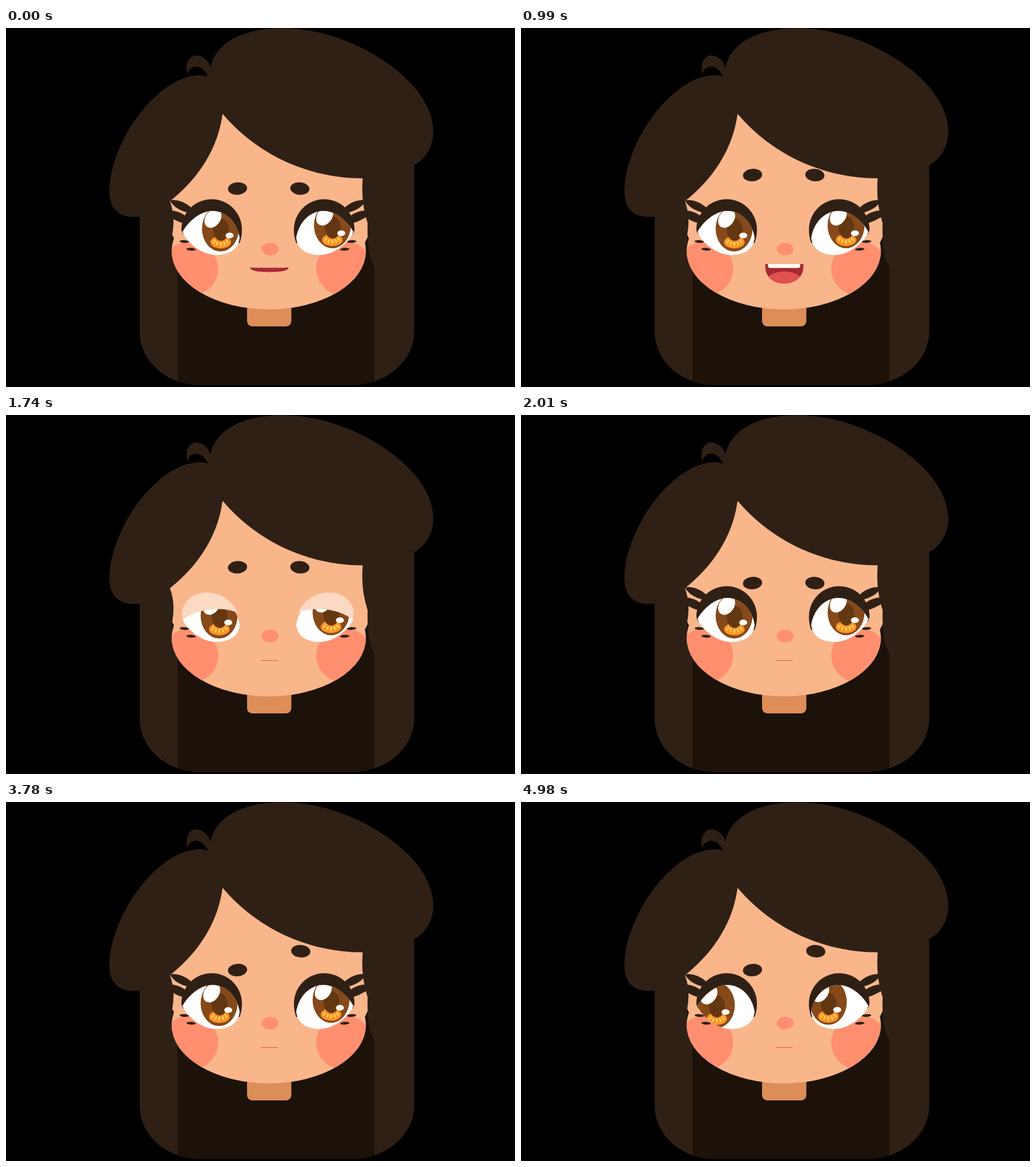
Write an HTML page that moves like this. It is 891x628 px and loops after 5100 ms.

```html
<!DOCTYPE html>
<html lang="en">
<head>
<meta charset="utf-8">
<title>Girl portrait</title>
<style>
  html, body { margin: 0; width: 100%; height: 100%; overflow: hidden; background: #000; }
  svg { display: block; width: 100vw; height: 100vh; }
  .hair { fill: #2f2015; }
  .skin { fill: #f9b68b; }
  .blush { fill: #ff8f6e; }
</style>
</head>
<body>
<svg viewBox="0 0 891 628" xmlns="http://www.w3.org/2000/svg">
  <defs>
    <path id="body" d="M234 200H714.5V531C714.5 583 665 624.500 605 624.500H340C281 624.500 234 583 234 531Z"/>
    <ellipse id="cheeks" cx="460" cy="390" rx="170" ry="102.300"/>
    <path id="white" d="M309 357C316 342 338 320 361 320C386 320 405 341 409 367C407 386 392 397 368 397C341 397 316 374 309 357Z"/>
    <path id="socket" d="M308 347C309 325 330 310.500 350 310.500C383 310 409 335 410 366C407 386 392 397.500 368 397.500C342 397 311 374 308 347Z"/>
    <path id="mouthShape" d="M427.500 413H494.500V417C494 437 478 447 461 447C443 447 428 437 427.500 417Z"/>
    <clipPath id="bodyClip"><use href="#body"/></clipPath>
    <clipPath id="faceClip"><use href="#cheeks"/></clipPath>
    <clipPath id="whiteL"><use href="#white"/></clipPath>
    <clipPath id="whiteR"><use href="#white" transform="matrix(-1 0 0 1 917 0)"/></clipPath>
    <clipPath id="socketClip"><use href="#socket"/></clipPath>
    <clipPath id="mouthClip"><use class="mouth" href="#mouthShape"/></clipPath>

    <g id="lashes" class="hair">
      <path d="M310 361C308 357 307 355 307 352A53 53 0 0 1 413 353C413 363 411 370 409 376Z"/>
      <path d="M287.500 302C295 299 312 303 324 314L318 323C303 319 293 312 287.500 303Z"/>
      <path d="M285 319C297 319 308 323 315 330L309 341C302 339 294 335 285 330Z"/>
    </g>
    <g id="lowLashes" class="hair">
      <ellipse cx="312" cy="373.500" rx="8.200" ry="2.400" transform="rotate(4 312 373.500)"/>
      <ellipse cx="324" cy="387" rx="8.200" ry="2.400" transform="rotate(4 324 387)"/>
    </g>
    <g id="lid" clip-path="url(#socketClip)">
      <path class="lidEdge" fill="#fbd9c3" d="M300 200V388C335 353 395 355 420 376V200Z"/>
    </g>
    <g id="irisInner">
      <ellipse cx="373.500" cy="374.700" rx="18" ry="10.800" fill="#ff9426"/>
      <ellipse cx="374" cy="353" rx="13.700" ry="19.500" fill="#633711"/>
      <g id="sparks" fill="#ffdc6c"></g>
      <ellipse cx="360" cy="333" rx="13" ry="18" fill="#fff" transform="rotate(35 360 333)"/>
      <ellipse cx="389" cy="363" rx="7" ry="5" fill="#fff"/>
    </g>
  </defs>

  <rect width="891" height="628"/>
  <use href="#body" class="hair"/>
  <rect x="300" y="340" width="345" height="290" fill="#1c120a" clip-path="url(#bodyClip)"/>
  <path d="M290.500 361L296 368L291 376Z" fill="#1c120a"/>
  <rect x="422" y="470" width="77.500" height="52" rx="9" fill="#dd8d58"/>
  <path class="skin" d="M379 150L280 290L287 303Q297 330 291 362L294 368V376H628L633 366V341Q622 305 625 255Z"/>
  <use href="#cheeks" class="skin"/>
  <g class="blush">
    <g clip-path="url(#faceClip)">
      <ellipse cx="322" cy="421" rx="49.500" ry="47.500"/>
      <ellipse cx="592.500" cy="421" rx="49.500" ry="47.500"/>
    </g>
    <ellipse cx="462.300" cy="386.800" rx="14.800" ry="11"/>
  </g>
  <path class="hair" d="M625 258Q620 302 633 341C632 375 635 402 645 417H665V240Z"/>

  <path class="hair" d="M379 150L358 69L354 85C345 82 337 82 332 83C283 88 236 140 212 183C192 219 181 255 181 285C181 316 197 334 234 330L250 328L287 303C336 264 371 212 379 150Z"/>
  <path class="hair" d="M379 150L350 110L354 85L358 69C367 26 415 0 484 .5C580 0 675 55 716 105C738 132 748 158 748 183C747 208 735 229 714 240L625 263C532 263 442 224 379 150Z"/>
  <path class="hair" d="M317.500 82C313 60 321 48 334 48C346 49 354 57 358 69L354 86C348 73 341 67.500 332 67.500C324 68 319 73 317.500 82Z"/>

  <g id="upper">
    <use href="#lashes"/>
    <use href="#lashes" transform="matrix(-1 0 0 1 917 0)"/>
  </g>
  <use href="#white" fill="#fff"/>
  <use href="#white" fill="#fff" transform="matrix(-1 0 0 1 917 0)"/>
  <g clip-path="url(#whiteL)">
    <g class="iris">
      <ellipse cx="373" cy="351" rx="32.300" ry="40" fill="#85491a"/>
      <use href="#irisInner"/>
    </g>
  </g>
  <g clip-path="url(#whiteR)">
    <g class="iris">
      <ellipse cx="569" cy="345.300" rx="32.300" ry="40" fill="#85491a"/>
      <use href="#irisInner" x="195.500" y="-4"/>
    </g>
  </g>
  <g id="lids">
    <use href="#lid"/>
    <use href="#lid" transform="matrix(-1 0 0 1 917 0)"/>
  </g>
  <use href="#lowLashes"/>
  <use href="#lowLashes" transform="matrix(-1 0 0 1 917 0)"/>

  <ellipse id="browL" class="hair" rx="16.800" ry="10.900"/>
  <ellipse id="browR" class="hair" rx="16.800" ry="10.900"/>

  <use class="mouth" href="#mouthShape" fill="#a52a32"/>
  <g clip-path="url(#mouthClip)">
    <ellipse cx="461" cy="442" rx="31" ry="16" fill="#e24f4f"/>
    <g class="mouth">
      <path id="teeth" d="M432.500 0H488.500V3.500Q488.500 6.800 485 6.800H436Q432.500 6.800 432.500 3.500Z" fill="#fff"/>
    </g>
  </g>
</svg>
<script>
const LOOP = 5100;
const $ = s => document.querySelector(s);
const place = (el, value) => el.setAttribute('transform', value);

const out = p => 1 - (1 - p) ** 2;
const backHalf = p => p * p * (3.59 * p - 2.59) / 2;
const backInOut = p => p < .5 ? backHalf(2 * p) : 1 - backHalf(2 - 2 * p);

// Each move is [begin, end, target value, easing].
function track(first, ...moves) {
  return t => {
    let v = first;
    for (const [a, b, to, ease = out] of moves) {
      if (t <= a) break;
      v += (to - v) * ease(Math.min(1, (t - a) / (b - a)));
    }
    return v;
  };
}

const lookX = track(2.5, [0, 420, -26], [790, 990, 0], [4185, 4650, -31, backInOut]);
const lookY = track(0, [2900, 3210, 18], [3380, 3780, 1], [4790, 4980, 4.5]);
const browLeft = track(281, [0, 420, 257.3], [1700, 2010, 294]);
const browRight = track(281, [0, 420, 257.3], [1700, 2010, 294], [2900, 3210, 261]);
const browShift = track(0, [2900, 3210, 1.6]);
const mouthY = track(423, [0, 420, 430], [1130, 1330, 428.5], [1330, 1530, 429.6]);
const mouthW = track(1, [1320, 1530, .45]);
const mouthH = track(.24, [0, 420, 1], [1130, 1330, .03]);

// Lid closure from 0 (open) to 1 (shut).
const blinks = [1130, 1700];
const closure = t => Math.max(0, ...blinks.map(b => 1 - Math.abs(t - b - 150) / 150));

for (let i = -2; i <= 2; i++) {
  const a = i * 25, r = a * Math.PI / 180;
  const spark = document.createElementNS('http://www.w3.org/2000/svg', 'ellipse');
  spark.setAttribute('rx', 1.4);
  spark.setAttribute('ry', 3.5);
  place(spark, `translate(${373.5 + 15 * Math.sin(r)} ${366 + 12 * Math.cos(r)}) rotate(${-a * .7})`);
  $('#sparks').append(spark);
}

const irises = document.querySelectorAll('.iris');
const mouthParts = document.querySelectorAll('.mouth');

function draw(t) {
  irises.forEach(el => place(el, `translate(${lookX(t)} ${lookY(t)})`));
  place($('#browL'), `translate(405.3 ${browLeft(t)}) rotate(-5)`);
  place($('#browR'), `translate(${514.4 + browShift(t)} ${browRight(t)}) rotate(5)`);

  const height = mouthH(t);
  const pose = `translate(461 ${mouthY(t)}) scale(${mouthW(t)} ${height}) translate(-461 -430)`;
  mouthParts.forEach(el => place(el, pose));
  place($('#teeth'), `translate(0 413) scale(1 ${height})`);

  const shut = closure(t);
  $('#upper').setAttribute('visibility', shut > 0 ? 'hidden' : 'visible');
  $('#lids').setAttribute('visibility', shut > 0 ? 'visible' : 'hidden');
  place($('.lidEdge'), `translate(0 ${82 * shut - 44})`);
}

const start = performance.now();
function tick() {
  draw((performance.now() - start) % LOOP);
  requestAnimationFrame(tick);
}
draw(0);
requestAnimationFrame(tick);
</script>
</body>
</html>
```
